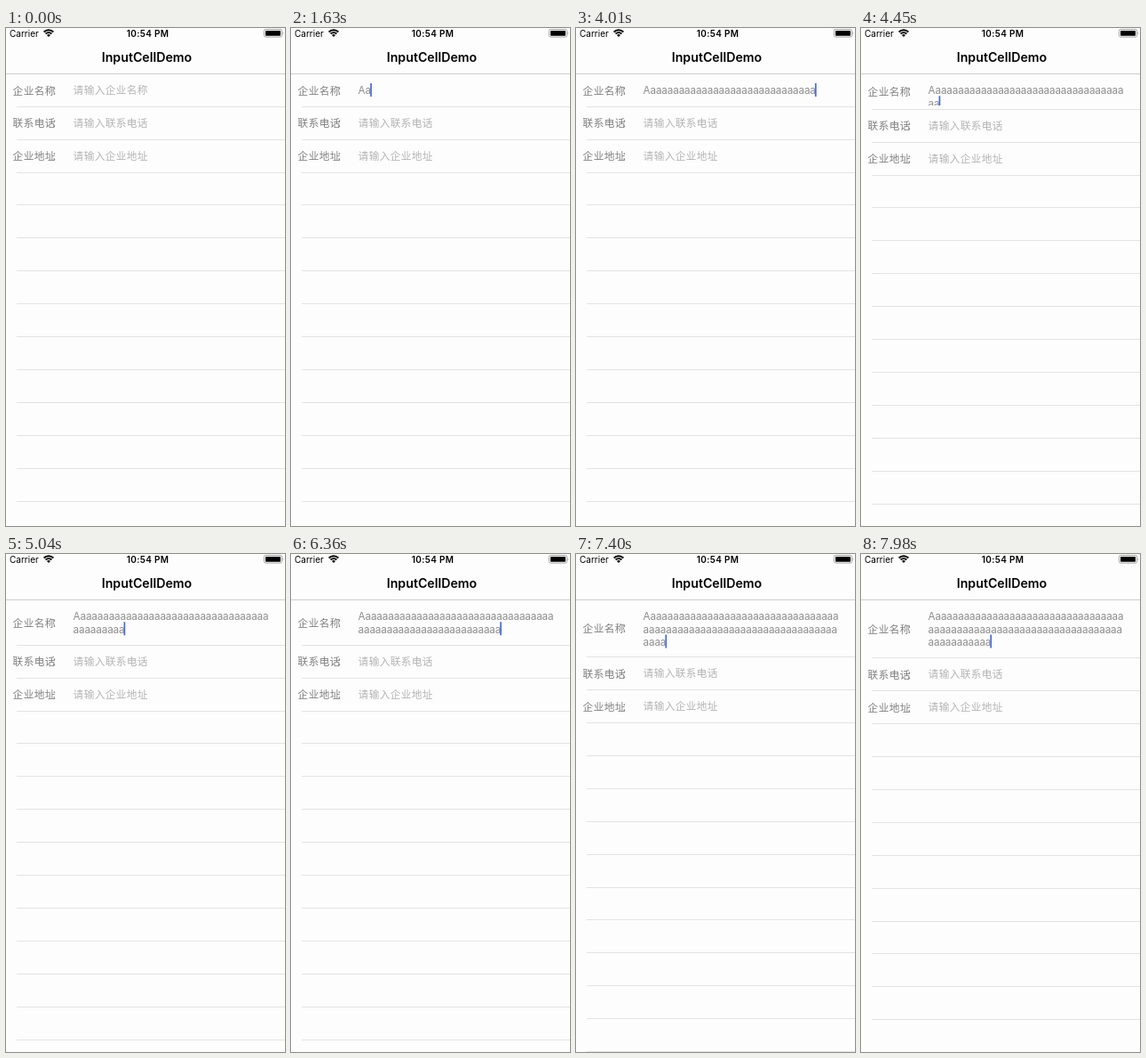
Recreate the animation shown at these times as an HTML page. Size 314 by 559 pixels, loop 8000 ms.

```html
<!DOCTYPE html>
<html lang="zh-CN">
<head>
<meta charset="utf-8">
<title>InputCellDemo</title>
<style>
  html, body { margin: 0; width: 100%; height: 100%; overflow: hidden; background: #fdfdfd; }
  svg { display: block; width: 100%; height: 100%; }
  text { font-family: Inter, "Noto Sans CJK SC", "Noto Sans CJK", sans-serif; white-space: pre; }
  .cjk { font-family: "Noto Sans CJK SC", "Noto Sans CJK", sans-serif; font-size: 11.7px; letter-spacing: .35px; }
  .label { fill: #808080; }
  .hint { fill: #b4b4b4; }
  .typed { font-size: 11.7px; letter-spacing: -.14px; fill: #8e8e8e; }
  .status { font-size: 10px; }
  .time { font-weight: 600; letter-spacing: .32px; text-anchor: middle; }
  .title { font-size: 14.2px; font-weight: 600; text-anchor: middle; }
</style>
</head>
<body>
<svg id="stage" viewBox="0 0 314 559">
  <defs><clipPath id="clip"><rect id="clipBox" x="70" y="55" width="244" height="29"/></clipPath></defs>
  <rect y="51" width="314" height="1" fill="#cdcdcd"/>
  <text class="status" x="4" y="9.5">Carrier</text>
  <g fill="none" stroke="#000" stroke-width="1.8">
    <path d="M42.6 4.5A7.6 7.6 0 0 1 53.4 4.5"/>
    <path d="M44.6 6.5A4.8 4.8 0 0 1 51.4 6.5"/>
  </g>
  <path d="M48 9.9L46 7.9A2.8 2.8 0 0 1 50 7.9Z"/>
  <text class="status time" x="159.6" y="9.5">10:54 PM</text>
  <rect x="290.5" y="1.5" width="20" height="8.6" rx="1.8" fill="none" stroke="#8c8c8c" stroke-width=".8"/>
  <rect x="292" y="2.9" width="17" height="5.8" rx=".6"/>
  <path d="M311.7 4.2Q313.2 5.8 311.7 7.4Z" fill="#8c8c8c"/>
  <text class="title" x="158.5" y="38">InputCellDemo</text>
  <g id="lines" fill="#e3e3e3"></g>
  <g id="rows"></g>
  <g clip-path="url(#clip)">
    <g id="typed"></g>
    <rect id="caret" width="1.7" height="15" fill="#4669d8"/>
  </g>
</svg>
<script>
const LOOP = 8000, PITCH = 36.92, LEFT = 75.6, PER_LINE = 34, LEADING = 14.25;
const TYPE_START = 1630, STEP = 147.6;
const $ = id => document.getElementById(id);

function add(parent, tag, attrs, content = '') {
  const el = document.createElementNS('http://www.w3.org/2000/svg', tag);
  for (const key in attrs) el.setAttribute(key, attrs[key]);
  el.textContent = content;
  return parent.appendChild(el);
}

function addLabel(name) {
  const label = add($('rows'), 'text', { class: 'cjk label', x: 7.6 }, name);
  add(label, 'tspan', { dx: -4.2 }, '：');
  return label;
}

const lines = Array.from({ length: 14 }, () =>
  add($('lines'), 'rect', { x: 12, width: 302, height: 1 }));
const rows = ['企业名称', '联系电话', '企业地址'].map(name => ({
  label: addLabel(name),
  hint: add($('rows'), 'text', { class: 'cjk hint', x: LEFT }, '请输入' + name)
}));
const typed = [0, 1, 2].map(i =>
  add($('typed'), 'text', { class: 'typed', x: LEFT, y: 74.3 + i * LEADING }));

// Number of characters in the field
function charCount(t, step) {
  if (t < 1190) return 0;
  return step < 0 ? 1 : 1 + Math.floor(1.3 + 1.79 * step);
}

// Row growth after a line wrap, eased over three steps
function grow(steps, height) {
  if (steps < 0) return 0;
  const u = Math.min(1, .3 + .53 * steps);
  return height * u * u * (3 - 2 * u);
}

function caretAlpha(t) {
  if (t < 300 || (t >= 1040 && t < 1190)) return 0;
  return t < 450 || (t >= 890 && t < 1040) ? .5 : 1;
}

function draw(t) {
  const step = Math.floor((t - TYPE_START) / STEP);
  const count = charCount(t, step);
  const dy = grow(step - 19, 14.03) + grow(step - 38, 14.45);

  lines.forEach((line, i) => line.setAttribute('y', Math.floor(88.2 + PITCH * i + dy)));
  rows.forEach(({ label, hint }, i) => {
    label.setAttribute('y', 74.5 + PITCH * i + (i ? dy : dy / 2));
    hint.setAttribute('y', 74 + PITCH * i + (i ? dy : 0));
  });
  rows[0].hint.style.display = count ? 'none' : '';

  const value = count ? 'A' + 'a'.repeat(count - 1) : '';
  typed.forEach((el, i) => {
    el.textContent = value.slice(i * PER_LINE, (i + 1) * PER_LINE);
  });

  const row = Math.max(0, Math.ceil(count / PER_LINE) - 1);
  const col = count - row * PER_LINE;
  const width = col * 6.42 + (row || !count ? 0 : 1.58);
  $('caret').setAttribute('x', LEFT + width - .85);
  $('caret').setAttribute('y', 62 + row * LEADING);
  $('caret').setAttribute('opacity', caretAlpha(t));
  $('clipBox').setAttribute('height', 29 + dy);
}

const start = performance.now();
function tick() {
  draw((performance.now() - start) % LOOP);
  requestAnimationFrame(tick);
}
tick();
</script>
</body>
</html>
```
